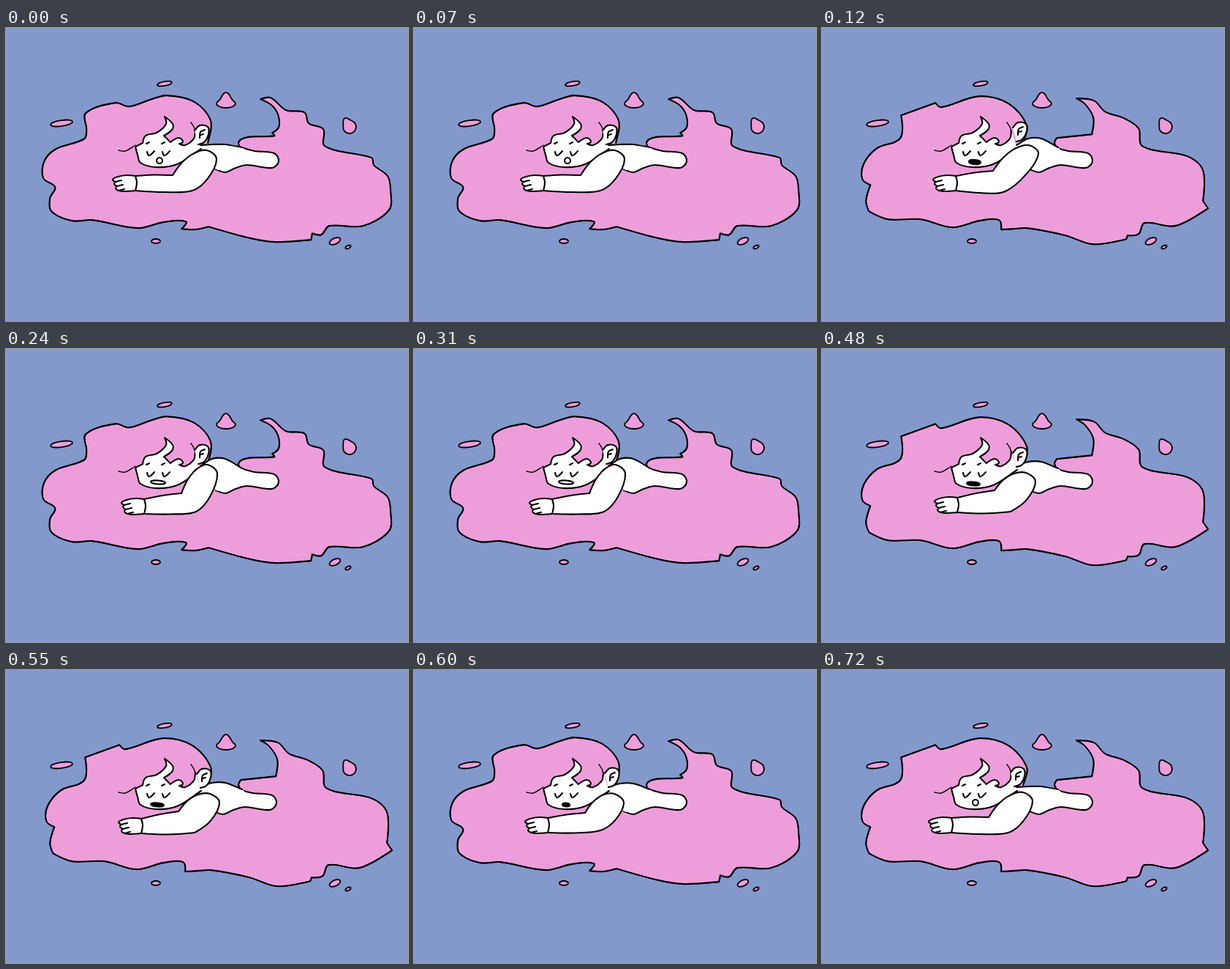
These frames come from a looping animation (550 by 400 pixels, 840 ms). An HTML page:

```html
<!DOCTYPE html>
<html lang="en">
<head>
<meta charset="utf-8">
<title>Dreamer on a pink cloud</title>
<style>
  html, body { margin: 0; width: 100%; height: 100%; overflow: hidden; background: #8399cc; }
  svg { display: block; width: 550px; height: 400px; }
  path, ellipse { fill: none; stroke: #000; stroke-width: 2.1; stroke-linecap: round; stroke-linejoin: round; }
  .pink { fill: #ed9eda; stroke-width: 1.8; }
  .shade { stroke-width: 1.5; transform: translate(.5px, .5px); }
  .white { fill: #fff; }
  .patch { fill: #fff; stroke: none; }
  .ink { fill: #000; }
  .fine { stroke-width: 1.4; }
  .cloud, .pose { visibility: hidden; animation: 840ms step-end infinite; }
  .cloud.a { animation-name: cloudA; }
  .cloud.b { animation-name: cloudB; }
  .cloud.b .torso { transform: translateX(-3px); }
  .pose { animation-name: once; animation-delay: calc(var(--i) * 120ms - 840ms); }
  .pose.rest { animation-name: twice; animation-delay: -120ms; }
  @keyframes once { 0% { visibility: visible } 14.2857%, 100% { visibility: hidden } }
  @keyframes twice { 0% { visibility: visible } 28.5714%, 100% { visibility: hidden } }
  @keyframes cloudA {
    0%, 28.5714%, 71.4286% { visibility: visible }
    14.2857%, 57.1429%, 85.7143%, 100% { visibility: hidden }
  }
  @keyframes cloudB {
    14.2857%, 57.1429%, 85.7143% { visibility: visible }
    0%, 28.5714%, 71.4286%, 100% { visibility: hidden }
  }
</style>
</head>
<body>
<svg id="stage" viewBox="0 0 550 400"></svg>
<script>
const stage = document.getElementById("stage");

function add(parent, tag, attrs) {
  const el = document.createElementNS("http://www.w3.org/2000/svg", tag);
  for (const k in attrs) el.setAttribute(k, attrs[k]);
  return parent.appendChild(el);
}

// Points are [x, y, sharp]; in text they read "x,y", with "!" for a sharp corner.
const parse = text => text.trim().split(/\s+/).map(s =>
  [...s.replace("!", "").split(",").map(Number), s.endsWith("!")]);
const mix = (p, q, t, dx = 0, dy = 0) => [p[0] + (q[0] - p[0]) * t + dx, p[1] + (q[1] - p[1]) * t + dy];
const move = (p, dx, dy, sharp) => [p[0] + dx, p[1] + dy, sharp];

// Smooth curve whose handles scale with each span.
function curve(pts, closed) {
  const n = pts.length;
  const at = i => closed ? pts[(i + n) % n] : pts[Math.max(0, Math.min(n - 1, i))];
  const handle = (i, len) => {
    const a = at(i - 1), b = at(i + 1), dx = b[0] - a[0], dy = b[1] - a[1];
    const k = at(i)[2] ? 0 : 0.32 * len / (Math.hypot(dx, dy) || 1);
    return [dx * k, dy * k];
  };
  let d = `M${pts[0][0]} ${pts[0][1]}`;
  for (let i = 0; i < (closed ? n : n - 1); i++) {
    const p = at(i), q = at(i + 1), len = Math.hypot(q[0] - p[0], q[1] - p[1]);
    const [a, b] = handle(i, len), [c, e] = handle(i + 1, len);
    d += `C${p[0] + a} ${p[1] + b} ${q[0] - c} ${q[1] - e} ${q[0]} ${q[1]}`;
  }
  return d;
}

const draw = (g, cls, pts, closed) =>
  add(g, "path", { class: cls, d: curve(typeof pts === "string" ? parse(pts) : pts, closed) });

// Clockwise from the fold behind the back to the ear.
const rims = {
  a: `325,168! 318,156 330,149 367,147 364,143! 373,135 372,118 363,105 348,97! 362,95 383,112 408,115 414,130
    434,138 436,161 500,177 503,187 522,202 526,222 524,248 488,270 442,270 431,282 419,280! 417,289! 368,292
    335,287 277,271! 258,275 240,274! 246,264 215,265 180,273 118,262 90,263 62,250 60,232 67,217 51,205 52,182
    68,165 107,151 110,138 109,116 150,102 168,107 196,98 220,92 258,101 280,127 276,157`,
  b: `325,168! 318,157 321,150! 369,145! 371,122 360,104 348,96! 372,99 387,114 413,123 433,137 438,161 500,175
    521,194 521,236! 528,246! 483,270 441,266 433,281 418,283! 416,288! 370,295 333,283 280,273 263,274 245,275!
    242,262 215,263 178,272 135,261 90,261 64,250! 60,236 66,214! 55,206 57,185 75,164 107,150 108,119! 155,102!
    163,108 215,93 255,103 280,133 275,157`
};

// x, y, rx, ry, tilt, spike
const drops = [
  [217, 76, 10, 3, -10, 0], [76, 130, 15, 4, -8, 0], [301, 103, 13, 6, 0, 1.5], [470, 135, 9, 9, -30, .5],
  [205, 291, 6, 3, 0, 0], [450, 291, 8, 4, -25, 0], [468, 299, 4, 2, -25, 0]
];

function drawDrop(g, [x, y, rx, ry, tilt, spike]) {
  const pts = [];
  for (let i = 0; i < 8; i++) {
    const a = (i - 2) * Math.PI / 4, top = i === 0;
    pts.push([rx * Math.cos(a), ry * Math.sin(a) * (top ? 1 + spike : 1)]);
  }
  draw(g, "pink", pts, true).setAttribute("transform", `translate(${x} ${y}) rotate(${tilt})`);
}

function drawCloud(key) {
  const g = add(stage, "g", { class: "cloud " + key });
  draw(g, "pink", rims[key]);
  draw(g, "shade", rims[key]);
  drops.forEach(d => drawDrop(g, d));
  draw(g, "white torso", "322,163 340,168 367,171 373,182 364,191 330,187 314,191 300,197 287,193");
}

function drawBack(g, y) {
  const back = parse(`266,160 282,${y} 300,${y} 323,163`);
  draw(g, "patch", [...back, [335, 180, true], [290, 194, true], [262, 178, true]]);
  draw(g, "", back);
}

function drawFace(g) {
  draw(g, "white", `259,140 257,151 245,160 237,158! 242,155 236,150 225,156! 216,147! 227,139 228,131 217,121!
    219,131 206,143 191,147 187,157! 177,162! 180,173 184,184 205,190 234,186 267,165`);
  draw(g, "fine", "154,167 163,168 177,160");
  draw(g, "fine", "253,129 257,135 259,142");
  for (const x of [193, 214]) {
    draw(g, "", [[x, 169], [x + 2, 174], [x + 5, 173], [x + 10, 168]]);
    draw(g, "", [[x - 1, 158], [x + 3, 156]]);
  }
}

function drawArm(g, { wrist, bend, shoulder, elbow }) {
  const crook = move(wrist, 51, bend, true);
  const back = move(shoulder, 13, 12);
  const cuff = move(wrist, 0, 20, true);
  draw(g, "white", [
    wrist, mix(wrist, crook, .5, 0, -1), crook,
    mix(crook, shoulder, .35, -4, -5), mix(crook, shoulder, .7, -4, -6),
    shoulder, back, mix(back, elbow, .55, 6, 3), elbow, mix(elbow, cuff, .5, 0, 2), cuff
  ]);

  const hand = [move(wrist, 0, 0, true), move(wrist, -12, -1), move(wrist, -24, 1)];
  const gaps = [];
  for (let k = 0; k < 3; k++) {
    const gap = move(wrist, -27 + 2 * k, 8 + 6 * k, true);
    hand.push(move(gap, -4, -3), gap);
    gaps.push(gap);
  }
  draw(g, "white", [...hand, move(wrist, -16, 21), cuff]);
  gaps.forEach(p => draw(g, "", [p, move(p, 8, -2)]));
  draw(g, "", [wrist, move(wrist, 2, 9), cuff]);
}

function drawEar(g, [x, y]) {
  const ear = add(g, "g", { transform: `translate(${x} ${y})` });
  draw(ear, "white", "-10,-5 -3,-12 8,-10 9,0 3,11 -5,14");
  draw(ear, "", "4,-6 -2,-3 -3,5");
  draw(ear, "", "-2,1 2,0");
}

function drawMouth(g, [cx, cy, rx, ry, cls]) {
  add(g, "ellipse", { class: cls, cx, cy, rx, ry, transform: `rotate(4 ${cx} ${cy})` });
}

const poses = [
  { wrist: [177, 202], bend: -1, shoulder: [275, 167], elbow: [255, 222], back: 159, ear: [268, 145],
    mouth: [210, 181, 4, 4, "white"] },
  { wrist: [183, 202], bend: -7, shoulder: [283, 160], elbow: [248, 224], back: 151, ear: [271, 141],
    mouth: [209, 183, 8, 3, "ink"] },
  { wrist: [189, 205], bend: -8, shoulder: [276, 158], elbow: [260, 222], back: 150, ear: [268, 143],
    mouth: [208, 182, 10, 2.5, "white"] },
  { wrist: [191, 205], bend: -9, shoulder: [283, 163], elbow: [262, 220, true], back: 152, ear: [270, 145],
    mouth: [207, 183, 10, 2.5, "white"] },
  { wrist: [185, 203], bend: -10, shoulder: [279, 169], elbow: [258, 222, true], back: 154, ear: [271, 147],
    mouth: [207, 184, 9, 2.5, "ink"] },
  { wrist: [183, 202], bend: -7, shoulder: [274, 169], elbow: [255, 219], back: 155, ear: [271, 146],
    mouth: [208, 184, 5, 2.5, "ink"] }
];

function drawPose(p, i) {
  const g = add(stage, "g", { class: i ? "pose" : "pose rest", style: `--i:${i}` });
  drawBack(g, p.back);
  drawFace(g);
  drawMouth(g, p.mouth);
  drawEar(g, p.ear);
  drawArm(g, p);
}

Object.keys(rims).forEach(drawCloud);
poses.forEach(drawPose);
</script>
</body>
</html>
```
